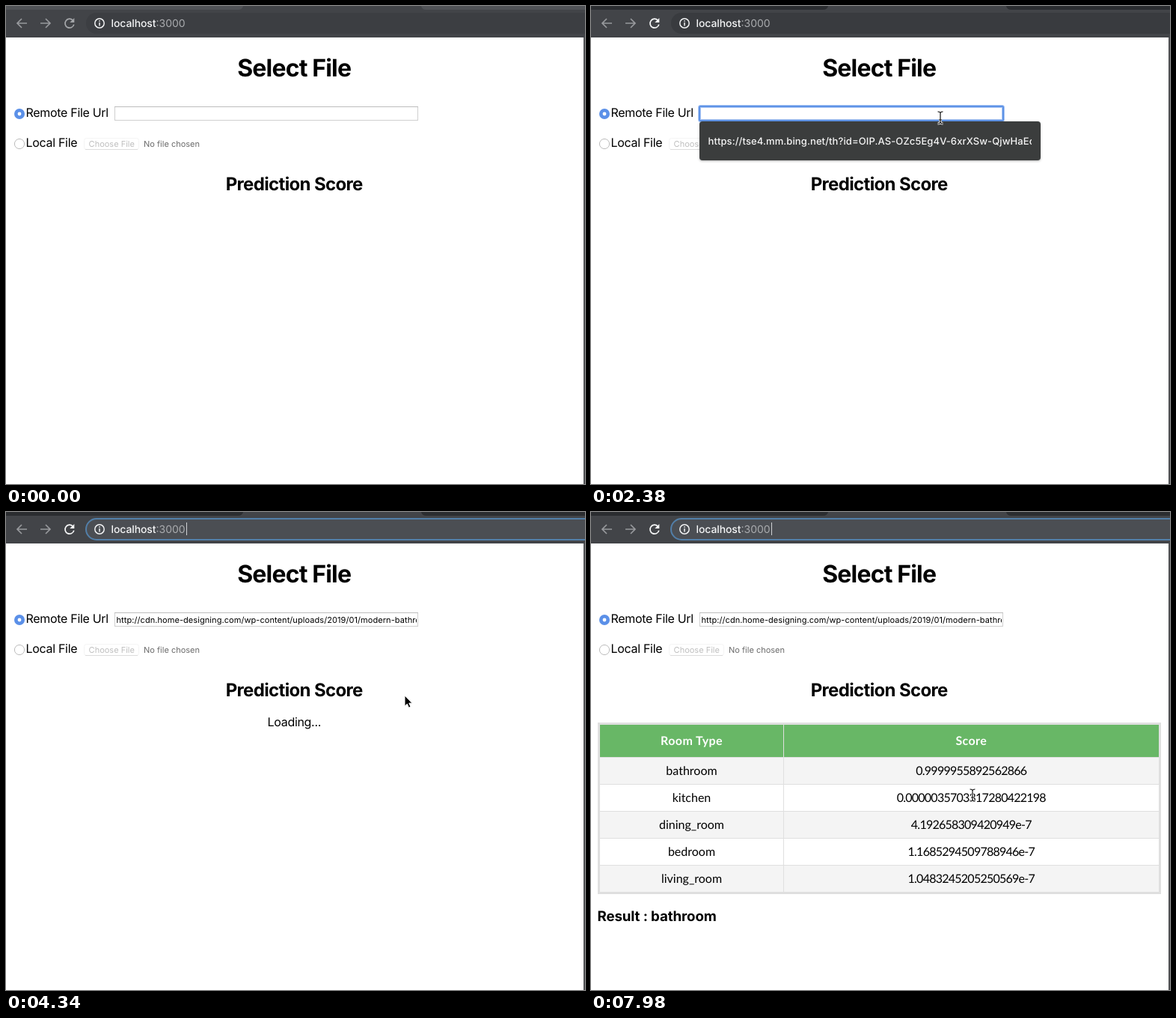
These frames come from a looping animation (774 by 638 pixels, 8000 ms). An HTML page:

```html
<!DOCTYPE html>
<html lang="en">
<head>
<meta charset="utf-8">
<title>Room type prediction</title>
<style>
  html, body { margin: 0; width: 100%; height: 100%; overflow: hidden; background: #fff; }
  svg { display: block; width: 774px; height: 638px; }
  text { font: 16px Inter, sans-serif; fill: #000; white-space: pre; text-rendering: geometricPrecision; }
  .mid { text-anchor: middle; }
  .label { letter-spacing: -.02em; }
  .h1 { font-size: 32px; font-weight: 700; letter-spacing: -.026em; }
  .h2 { font-size: 24px; font-weight: 700; letter-spacing: -.027em; }
  .h3 { font-size: 18.72px; font-weight: 700; letter-spacing: -.006em; }
  .small { font-size: 11px; }
  #url { letter-spacing: .07px; }
  .bar { font-size: 14px; fill: #f4f5f6; }
  .host { font-weight: 500; letter-spacing: -.1px; }
  .hint { font-size: 13px; font-weight: 500; letter-spacing: .1px; fill: #f5f5f5; }
  #table text { font-family: Lato, "Open Sans", sans-serif; }
  #table .th { font-weight: 700; fill: #fff; letter-spacing: .4px; }
  #table .num { letter-spacing: -.75px; }
  #table .h3 { font-family: Inter, sans-serif; }
  .icon { fill: none; stroke: #97999c; stroke-width: 1.7; }
</style>
</head>
<body>
<svg viewBox="0 0 774 638" xmlns="http://www.w3.org/2000/svg">
  <defs>
    <clipPath id="fieldClip"><rect x="147" y="135" width="402" height="18"/></clipPath>
    <clipPath id="hintClip"><rect x="156" y="160" width="433" height="40"/></clipPath>
    <filter id="shade" x="-5%" y="-20%" width="110%" height="150%">
      <feDropShadow dx="0" dy="1" stdDeviation="1.5" flood-opacity=".3"/>
    </filter>
  </defs>

  <rect width="774" height="638" fill="#fff"/>
  <rect x="772" y="41" width="2" height="597" fill="#505154"/>

  <!-- browser bar -->
  <rect width="774" height="42" fill="#424448"/>
  <path id="strip" d="M0 0H317Q316 5 310 5H0ZM555 0H774V5H562Q556 5 555 0Z"/>
  <rect id="pill" x="107" y="9" width="700" height="28" rx="14" stroke-width="2"/>
  <path class="icon" d="M28 23H15.5M21 17L15 23L21 29"/>
  <path class="icon" d="M46 23H58.5M53 17L59 23L53 29"/>
  <g id="reload" class="icon">
    <path d="M89.3 19A6 6 0 1 0 90.8 24.6"/>
    <path d="M91.3 16V22H85.3Z" stroke="none"/>
  </g>
  <circle cx="125" cy="23" r="6.2" fill="none" stroke="#f1f2f3" stroke-width="1.5"/>
  <path d="M125 22V26.6M125 19.2V20.8" stroke="#f1f2f3" stroke-width="1.5"/>
  <text class="bar" x="140.5" y="28"><tspan class="host">localhost</tspan><tspan fill="#a9abae">:3000</tspan></text>
  <rect id="barCaret" x="241" y="14" width="1" height="17" fill="#d0d2d5"/>

  <!-- form -->
  <text class="h1 mid" x="385.2" y="94">Select File</text>
  <circle cx="18" cy="144" r="7" fill="#5b90e8"/>
  <circle cx="18" cy="144" r="2.4" fill="#fff"/>
  <text class="label" x="26.6" y="148">Remote File Url</text>
  <rect x="145.5" y="134.5" width="405" height="18" fill="#fff" stroke="#cfcfcf"/>
  <path d="M145 134.5H551" stroke="#bdbdbd"/>
  <g clip-path="url(#fieldClip)">
    <text id="url" class="small" x="147.5" y="148">http://cdn.home-designing.com/wp-content/uploads/2019/01/modern-bathroom</text>
  </g>
  <circle cx="18" cy="184" r="6.6" fill="#fff" stroke="#bcbcbc"/>
  <text class="label" x="26.6" y="188">Local File</text>
  <rect x="104.5" y="176.5" width="73" height="15" rx="3" fill="#fff" stroke="#f4f4f4"/>
  <path d="M106 191.5H176" stroke="#dcdcdc"/>
  <text class="small" x="110.6" y="188" style="fill:#bfbfbf">Choose File</text>
  <text class="small" x="184" y="188" style="fill:#6c6c6c">No file chosen</text>

  <g id="focus">
    <rect x="145" y="134" width="406" height="19" rx="1.5" fill="none" stroke="#a9c5f4" stroke-width="4"/>
    <rect x="145" y="134" width="406" height="19" rx="1" fill="none" stroke="#5e93e6" stroke-width="2"/>
  </g>
  <rect id="fieldCaret" x="148" y="137" width="1" height="13"/>

  <text class="h2 mid" x="385.2" y="246">Prediction Score</text>
  <text id="loading" class="label mid" x="385.3" y="286">Loading...</text>
  <g id="table"></g>

  <g id="hint">
    <rect x="145" y="154" width="456" height="52" rx="4" fill="#3a3c3e" filter="url(#shade)"/>
    <g clip-path="url(#hintClip)">
      <text class="hint" x="156.5" y="185">https://tse4.mm.bing.net/th?id=OIP.AS-OZc5Eg4V-6xrXSw-QjwHaEc</text>
    </g>
  </g>

  <!-- pointers -->
  <path id="arrow" d="M0 0V14.2L3.3 11.2L5.5 16.2L8 15.1L5.8 10.2H10Z" fill="#000" stroke="#fff" stroke-width="1"/>
  <g id="beam" fill="none">
    <path d="M-3.5 -8Q0 -8 0 -5.5Q0 -8 3.5 -8M0 -6V6M-3.5 8Q0 8 0 5.5Q0 8 3.5 8M-2 3H2" stroke="#fff" stroke-width="3"/>
    <path d="M-3.5 -8Q0 -8 0 -5.5Q0 -8 3.5 -8M0 -6V6M-3.5 8Q0 8 0 5.5Q0 8 3.5 8M-2 3H2" stroke="#111" stroke-width="1.2"/>
  </g>
</svg>

<script>
const LOOP = 8000, STEP = 70, BLINK = 1050;
const $ = id => document.getElementById(id);

const rows = [
  ["bathroom", "0.9999955892562866"],
  ["kitchen", "0.0000035703317280422198"],
  ["dining_room", "4.192658309420949e-7"],
  ["bedroom", "1.1685294509788946e-7"],
  ["living_room", "1.0483245205250569e-7"]
];

function buildTable() {
  const rect = (x, y, w, h, fill) => `<rect x="${x}" y="${y}" width="${w}" height="${h}" fill="${fill}"/>`;
  const cell = (x, y, text, cls = "") => `<text class="mid ${cls}" x="${x}" y="${y}">${text}</text>`;
  let out = rect(9, 281, 753, 229, "#dfdfdf") + rect(12, 284, 747, 223, "#fff")
    + rect(12, 284, 747, 43, "#68b766")
    + cell(134.5, 311, "Room Type", "th") + cell(508.3, 311, "Score", "th");
  rows.forEach(([name, score], i) => {
    const y = 327 + i * 36;
    if (i % 2 === 0) out += rect(12, y, 747, 36, "#f4f4f4");
    out += rect(12, y, 747, 1, "#dfdfdf");
    out += cell(134.5, y + 24, name) + cell(508.3, y + 24, score, "num");
  });
  out += rect(257, 284, 1, 223, "#dfdfdf");
  out += '<text class="h3" x="8.5" y="546">Result : bathroom</text>';
  $("table").innerHTML = out;
}

// id, first ms, last ms
const spans = [
  ["focus", 1820, 3220],
  ["hint", 1820, 2730],
  ["fieldCaret", 1820, 2380],
  ["url", 2730, LOOP],
  ["loading", 3220, 6440],
  ["table", 6440, LOOP]
];

// start, end, from x, y, to x, y
const moves = [
  [560, 770, 370, 608, 462, 231],
  [910, 1260, 462, 231, 467, 151],
  [1330, 1400, 467, 151, 467, 149],
  [3780, 4060, 500, 190, 533, 245],
  [7770, 7980, 533, 245, 510, 378]
];

const show = (el, on) => { el.style.display = on ? "" : "none"; };
const ease = p => p * p * (3 - 2 * p);

function pointerAt(t) {
  const move = moves.filter(m => t >= m[0]).pop();
  if (!move) return [0, 0];
  const [start, end, x0, y0, x1, y1] = move;
  const p = ease(Math.min(1, (t - start) / (end - start)));
  return [x0 + (x1 - x0) * p, y0 + (y1 - y0) * p];
}

function draw(now) {
  const t = Math.floor((now % LOOP) / STEP) * STEP;
  for (const [id, from, to] of spans) show($(id), t >= from && t < to);

  const active = t >= 1400, typing = t >= 3220;
  $("strip").setAttribute("fill", active ? "#2b2d30" : "#515357");
  $("pill").setAttribute("fill", typing ? "#4b4e53" : active ? "#393b3f" : "#3c3e42");
  $("pill").setAttribute("stroke", typing ? "#527fa9" : "none");
  const tint = active ? "#f4f5f6" : "#a4a6a9";
  $("reload").children[0].style.stroke = tint;
  $("reload").children[1].style.fill = tint;
  show($("barCaret"), t >= 3290 && (t - 3290) % BLINK < BLINK / 2);

  const [x, y] = pointerAt(t);
  const visible = t >= 560 && (t < 2730 || t >= 3780);
  const beam = (t >= 1400 && t < 2730) || t >= 7910;
  for (const [id, on] of [["arrow", visible && !beam], ["beam", visible && beam]]) {
    show($(id), on);
    $(id).setAttribute("transform", `translate(${x.toFixed(1)} ${y.toFixed(1)})`);
  }
}

buildTable();
draw(0);
(function tick() {
  draw(performance.now());
  requestAnimationFrame(tick);
})();
</script>
</body>
</html>
```
